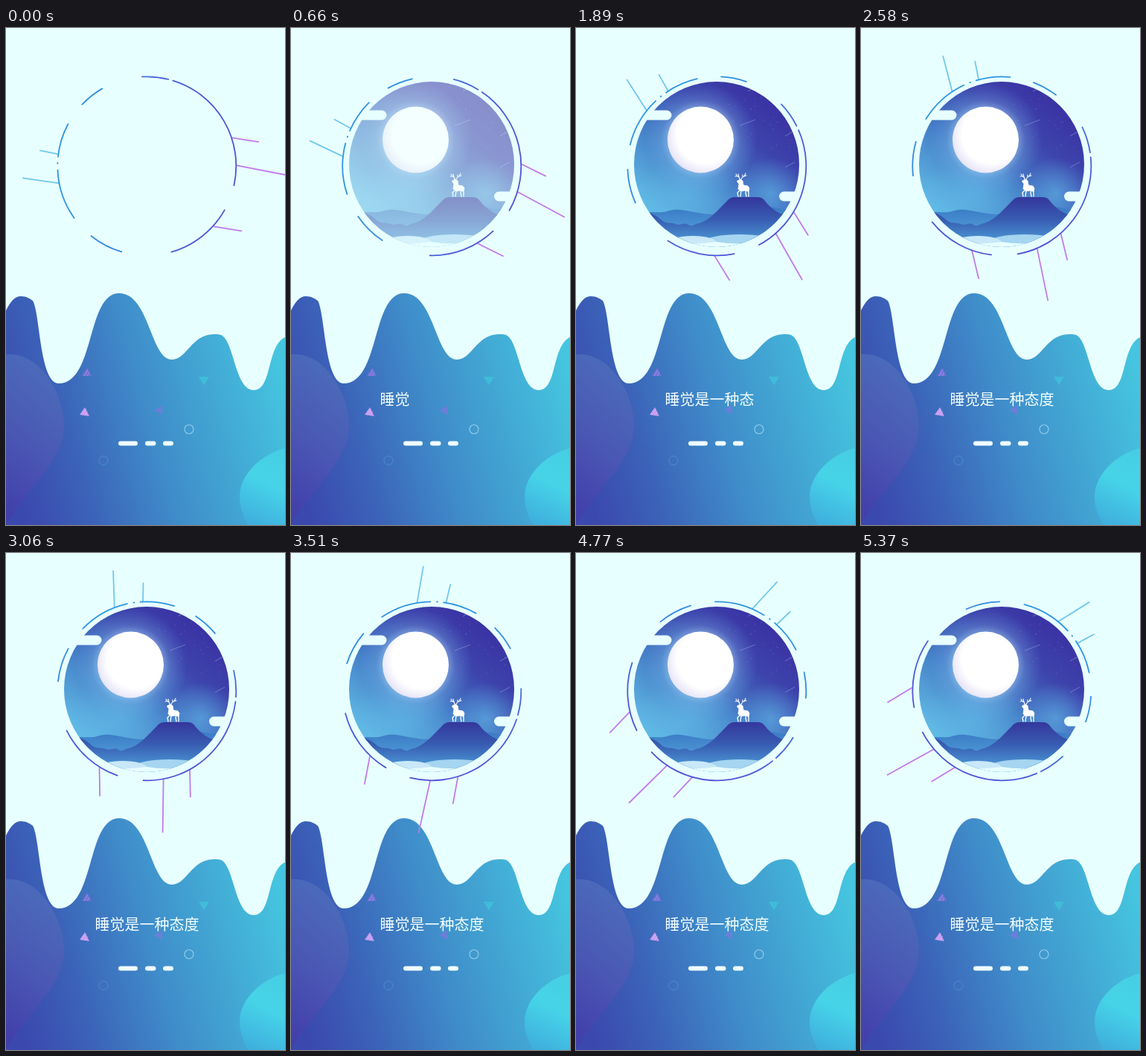
These frames come from a looping animation (375x667 px, 5.4 s). An HTML page:

```html
<!DOCTYPE html>
<html lang="zh-CN">
<head>
<meta charset="utf-8">
<style>
html, body { margin: 0; width: 100%; height: 100%; overflow: hidden; background: #e8ffff; }
svg { display: block; }
text { font: 20px "Noto Sans CJK SC", "Noto Sans CJK", sans-serif; fill: #f4ffff; }
</style>
</head>
<body>
<svg width="375" height="667" viewBox="0 0 375 667">
  <defs>
    <linearGradient id="sea" gradientUnits="userSpaceOnUse" x1="5" y1="580" x2="375" y2="475">
      <stop offset="0" stop-color="#3b49ae"/><stop offset=".22" stop-color="#3b62b8"/>
      <stop offset=".5" stop-color="#3f8bc9"/><stop offset="1" stop-color="#45c5df"/>
    </linearGradient>
    <linearGradient id="blobL" x1=".6" y1="0" x2=".3" y2="1">
      <stop offset="0" stop-color="#4b6dbb"/><stop offset=".55" stop-color="#4a57b4"/><stop offset="1" stop-color="#4240aa"/>
    </linearGradient>
    <linearGradient id="blobR" x1=".7" y1="0" x2=".4" y2="1">
      <stop offset="0" stop-color="#46cfe4"/><stop offset=".45" stop-color="#46d3e8"/><stop offset="1" stop-color="#3fb0de"/>
    </linearGradient>
    <linearGradient id="ring" gradientUnits="userSpaceOnUse" x1="-120" y1="0" x2="120" y2="0">
      <stop offset="0" stop-color="#2b96e2"/><stop offset=".35" stop-color="#3388e0"/>
      <stop offset=".55" stop-color="#4865da"/><stop offset="1" stop-color="#4e52d6"/>
    </linearGradient>
    <linearGradient id="sky" gradientUnits="userSpaceOnUse" x1="262" y1="88" x2="128" y2="262">
      <stop offset="0" stop-color="#3a30a2"/><stop offset=".3" stop-color="#3d44ac"/>
      <stop offset=".62" stop-color="#447cc6"/><stop offset="1" stop-color="#5fb9e4"/>
    </linearGradient>
    <radialGradient id="glow">
      <stop offset=".5" stop-color="#bfe4ff" stop-opacity=".65"/><stop offset=".7" stop-color="#8ccaf4" stop-opacity=".25"/>
      <stop offset="1" stop-color="#70b8f0" stop-opacity="0"/>
    </radialGradient>
    <radialGradient id="haze">
      <stop offset="0" stop-color="#62bbea" stop-opacity=".6"/><stop offset="1" stop-color="#62bbea" stop-opacity="0"/>
    </radialGradient>
    <radialGradient id="moon" cx=".58" cy=".42" r=".62">
      <stop offset=".7" stop-color="#fff"/><stop offset="1" stop-color="#e4e2f6"/>
    </radialGradient>
    <linearGradient id="far" x1="0" y1="0" x2="0" y2="1">
      <stop offset="0" stop-color="#3a78c4"/><stop offset="1" stop-color="#58aee0"/>
    </linearGradient>
    <linearGradient id="near" gradientUnits="userSpaceOnUse" x1="0" y1="227" x2="0" y2="288">
      <stop offset="0" stop-color="#34379c"/><stop offset=".5" stop-color="#385db2"/><stop offset="1" stop-color="#4c9ad6"/>
    </linearGradient>
    <clipPath id="disc"><circle cx="189" cy="183" r="111"/></clipPath>
    <clipPath id="wipe"><rect id="wipeBox" x="110" y="480" width="0" height="36"/></clipPath>
  </defs>

  <path fill="url(#sea)" d="M0 379C6 367 12 360 20 360C27 360 32 363 36 366C46 383 45 477 71 477C120 477 108 356 152 356C193 356 194 445 223 445C243 445 249 411 280 411C286 411 289 411 292 414C307 427 309 486 333 486C358 486 350 427 375 415V667H0Z"/>
  <path fill="url(#blobL)" d="M0 438C45 434 78 490 78 534C78 582 26 618 0 667Z"/>
  <path fill="url(#blobR)" d="M375 564C345 571 314 598 314 629C314 645 320 657 326 667H375Z"/>
  <path fill="#7470d8" d="M109 456L115 467L102 467Z"/>
  <path fill="#c79bf0" d="M106 509L112 521L99 519Z"/>
  <path fill="#6a7fd8" d="M210 506.500V519L199 513Z"/>
  <path fill="#3fbcd9" d="M259 468H273L266 479.500Z"/>
  <g stroke="#e8ffff" stroke-opacity=".35" stroke-width=".8">
    <path d="M105 467l5-8M109 467l3-5M102 519l6-8M106 520l4-6"/>
  </g>
  <circle cx="246" cy="538.500" r="6" fill="none" stroke="#8fcbe8" stroke-width="1.200"/>
  <circle cx="131" cy="580.500" r="6" fill="none" stroke="#4a8ed2"/>
  <g fill="#f0ffff">
    <rect x="151" y="554.500" width="26" height="6" rx="3"/>
    <rect x="187" y="554.500" width="14.500" height="6" rx="3"/>
    <rect x="211" y="554.500" width="14" height="6" rx="3"/>
  </g>
  <text x="119.500" y="505.500" clip-path="url(#wipe)">睡觉是一种态度</text>

  <g id="scene" opacity="0">
    <g clip-path="url(#disc)">
      <rect x="78" y="72" width="222" height="222" fill="url(#sky)"/>
      <ellipse cx="262" cy="222" rx="50" ry="48" fill="url(#haze)"/>
      <ellipse cx="150" cy="225" rx="85" ry="45" fill="url(#haze)"/>
      <circle cx="167.500" cy="150" r="76" fill="url(#glow)"/>
      <path stroke="#a9b8f0" stroke-opacity=".55" stroke-width=".8" d="M231 85l9-5M220 131l21-8M281 145l11-6M281 187l13-7"/>
      <g id="stars" fill="#b9c4ff" fill-opacity=".4"></g>
      <circle cx="167.500" cy="150" r="44.500" fill="url(#moon)"/>
      <path fill="url(#far)" d="M78 252C100 243 110 250 122 246C142 240 150 248 180 250L245 247C256 237 267 241 278 243C288 244 292 239 300 238V294H78Z"/>
      <path fill="url(#near)" d="M78 245C98 246 106 250 114 257C122 264 126 260 134 263C141 266 145 260 151 264C157 268 160 262 166 262C181 257 194 241 204 231Q208 227 213 227H244Q250 227 253 231C262 242 272 252 300 255V294H78Z"/>
      <ellipse cx="220" cy="286" rx="46" ry="9" fill="#a5d5f0"/>
      <ellipse cx="157" cy="288" rx="32" ry="9" fill="#c9e8f8"/>
      <path fill="#e8ffff" d="M110 284Q150 293 189 287Q225 293 265 283V296H110Z"/>
      <g fill="none" stroke="#fff" stroke-linecap="round" stroke-linejoin="round">
        <path fill="#fff" stroke-width=".8" d="M217 205l4-2 3 2 1 6 6 1 2 3-1 5-3-2-7 1-4-3 1-7-2-2Z"/>
        <path stroke-width="1.300" d="M220 218l-3 3 1 5M222 218l-1 8M229 217l-1 4 1 5M231 217l1 4v5"/>
        <path stroke-width="1.100" d="M220 203q0-3-3-4l-2-3M217 199l-3 0M219 200l-1-4M222 203q1-3 4-4l2-4M226 199l3-1M224 200l0-3"/>
      </g>
    </g>
    <g fill="#e8ffff">
      <rect x="76" y="110.500" width="52.500" height="13" rx="6.500"/>
      <rect x="273" y="219.500" width="40" height="13" rx="6.500"/>
    </g>
  </g>

  <g id="spin" fill="none" stroke-width="1.800" stroke-linecap="round">
    <path stroke="#c07be8" d="M115 -38L150 -32.500M120.500 -1L190 12.500M90 81L127 87"/>
    <path stroke="#6fc8ec" d="M-143.500 -21L-119 -16M-166.500 16L-118 23"/>
    <path id="arcs" stroke="url(#ring)"/>
  </g>
</svg>
<script>
const el = id => document.getElementById(id);
const LOOP = 5400, STEP = 30, R = 120;

// start and end angles in degrees, clockwise from the right
const spans = [[267, 284], [287, 372.5], [29.5, 74], [106.5, 128.5], [144.5, 177.5], [181.7, 182.1], [186, 208], [223.5, 240]];
const point = deg => {
  const a = deg * Math.PI / 180;
  return (R * Math.cos(a)).toFixed(2) + " " + (R * Math.sin(a)).toFixed(2);
};
el("arcs").setAttribute("d", spans.map(([a, b]) => `M${point(a)}A${R} ${R} 0 0 1 ${point(b)}`).join(""));

let seed = 7;
const random = () => (seed = seed * 16807 % 2147483647) / 2147483647;
el("stars").innerHTML = Array.from({ length: 28 }, () =>
  `<circle cx="${200 + random() * 95}" cy="${78 + random() * 90}" r=".5"/>`).join("");

function draw(now) {
  const t = Math.floor(now % LOOP / STEP) * STEP;
  el("spin").setAttribute("transform", `translate(189.300 185.300) rotate(${t * 0.02608})`);
  el("scene").setAttribute("opacity", Math.min(1, t / 1200));
  el("wipeBox").setAttribute("width", Math.min(160, 7 + t * 0.0645));
  requestAnimationFrame(draw);
}
draw(0);
</script>
</body>
</html>
```
